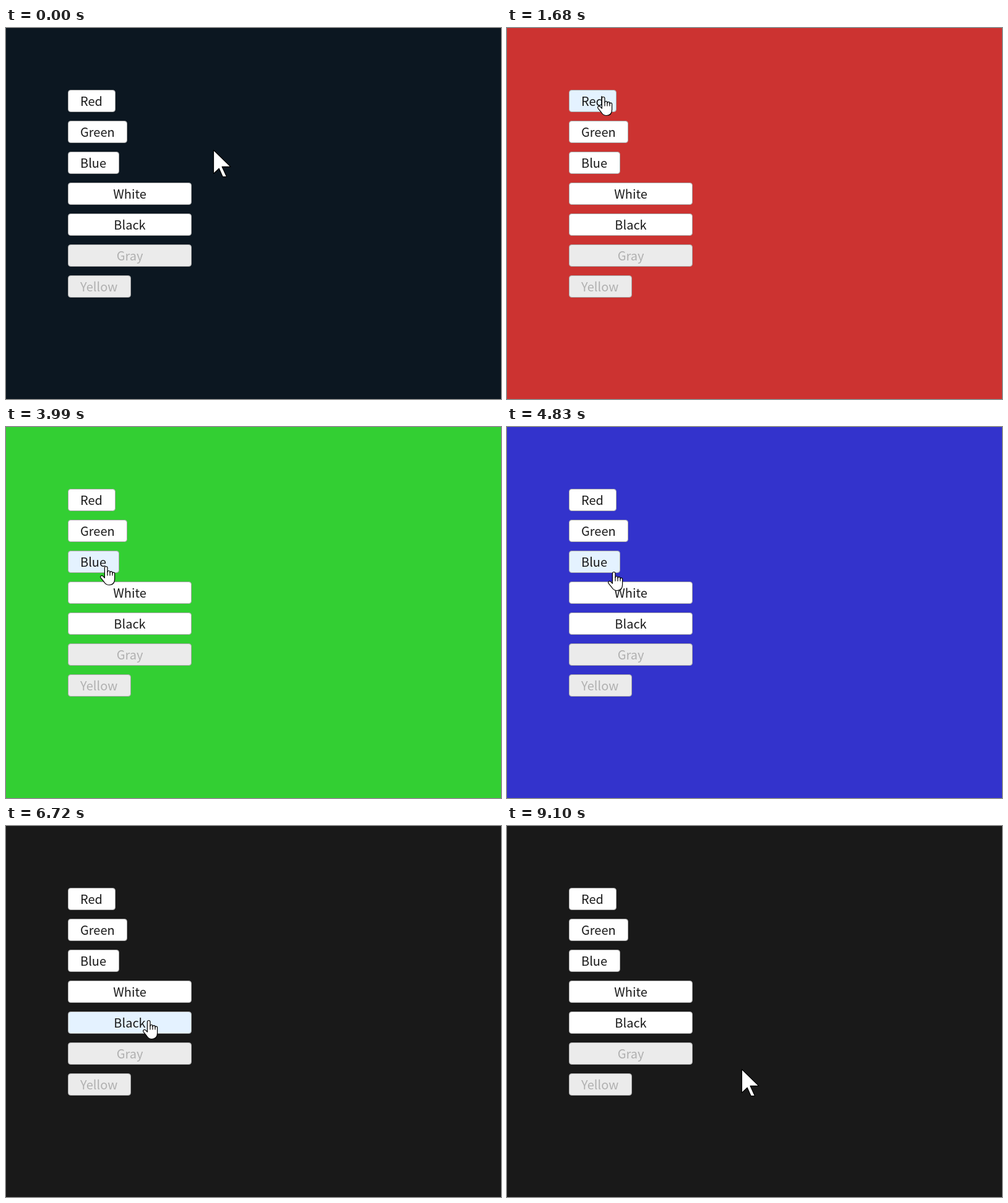
An HTML page that plays this animation: 800x600 px, repeating every 9240 ms.

```html
<!DOCTYPE html>
<html lang="en">
<head>
<meta charset="utf-8">
<title>Buttons</title>
<style>
html, body { margin: 0; width: 100%; height: 100%; overflow: hidden; }
svg { display: block; width: 100vw; height: 100vh; }
text { font: 20px "Noto Sans CJK JP", "Noto Sans CJK SC", "Noto Sans CJK", "Noto Sans", sans-serif; }
.cursor { fill: #fff; stroke: #000; stroke-width: 1.2; stroke-linejoin: round; stroke-linecap: round; }
</style>
</head>
<body>
<svg viewBox="0 0 800 600">
  <rect id="back" width="800" height="600"/>
  <g id="buttons"></g>
  <path id="arrow" class="cursor" d="M.5 .5V38.5L9.3 30.2L15.2 43.5H21.6L14.2 27.4H28Z"/>
  <g id="hand" class="cursor">
    <path d="M7.4 19V2.8a2.3 2.3 0 0 1 4.6 0V9.4a2 2 0 0 1 4 .2v.8a2 2 0 0 1 4 .3v1a1.8 1.8 0 0 1 3.6 .3V21c0 6-3.4 9.5-8.8 9.5-4.2 0-6.4-2-8.2-4.8L.9 18.6C-.2 16 2.6 14.3 4.6 16.1Z"/>
    <path fill="none" d="M12 9v6M16 10v5M20 11.5v3.5"/>
  </g>
</svg>
<script>
const LOOP = 9240, TICK = 70;
const $ = id => document.getElementById(id);

function add(parent, tag, attrs) {
  const el = document.createElementNS("http://www.w3.org/2000/svg", tag);
  for (const k in attrs) el.setAttribute(k, attrs[k]);
  return parent.appendChild(el);
}

const buttons = [
  ["Red", 77], ["Green", 96], ["Blue", 83], ["White", 200],
  ["Black", 200], ["Gray", 200, true], ["Yellow", 102, true]
].map(([label, w, off], i) => {
  const y = 100 + i * 50, wide = w === 200;
  const box = add($("buttons"), "rect", {
    x: 100.5, y: y + .5, width: w - 1, height: 35, rx: 4,
    fill: off ? "#ebebeb" : "#fff", stroke: "#a8a8a8"
  });
  add($("buttons"), "text", {
    x: wide ? 200 : 120, y: y + 26,
    "text-anchor": wide ? "middle" : "start",
    fill: off ? "#b0b0b0" : "#1a1a1a"
  }).textContent = label;
  return { y, w, off, box };
});

// [time, background]
const fills = [
  [0, "#0c1721"], [1680, "#cc3331"], [3150, "#33cf33"],
  [4340, "#3333cc"], [5530, "#e5e5e5"], [6720, "#191919"]
];

// [first tick, number of ticks, x, y]
const moves = [
  [420, 13, 155, 111],
  [2170, 5, 163, 190], [2520, 3, 160, 165],
  [3570, 7, 161, 225],
  [4830, 4, 230, 285],
  [6020, 4, 230, 317], [6300, 2, 230, 314],
  [7350, 6, 201, 369],
  [8680, 7, 379, 393]
];

const ease = p => p * p * (3 - 2 * p);

function pointer(t) {
  let x = 335, y = 197;
  for (const [start, n, tx, ty] of moves) {
    if (t < start) break;
    const p = ease(Math.min(1, ((t - start) / TICK + 1) / n));
    x += (tx - x) * p;
    y += (ty - y) * p;
  }
  return [Math.round(x), Math.round(y)];
}

function draw(ms) {
  const t = Math.floor(ms % LOOP / TICK) * TICK;
  const [x, y] = pointer(t);
  let over = false;
  for (const b of buttons) {
    if (b.off) continue;
    const hit = x >= 100 && x < 100 + b.w && y >= b.y && y < b.y + 36;
    b.box.setAttribute("fill", hit ? "#e4f2ff" : "#fff");
    over = over || hit;
  }
  $("back").setAttribute("fill", fills.filter(f => f[0] <= t).pop()[1]);
  $("arrow").setAttribute("transform", `translate(${x} ${y})`);
  $("hand").setAttribute("transform", `translate(${x - 9} ${y})`);
  $("arrow").setAttribute("visibility", over ? "hidden" : "visible");
  $("hand").setAttribute("visibility", over ? "visible" : "hidden");
}

const begin = performance.now();
function frame() {
  draw(performance.now() - begin);
  requestAnimationFrame(frame);
}
frame();
</script>
</body>
</html>
```
